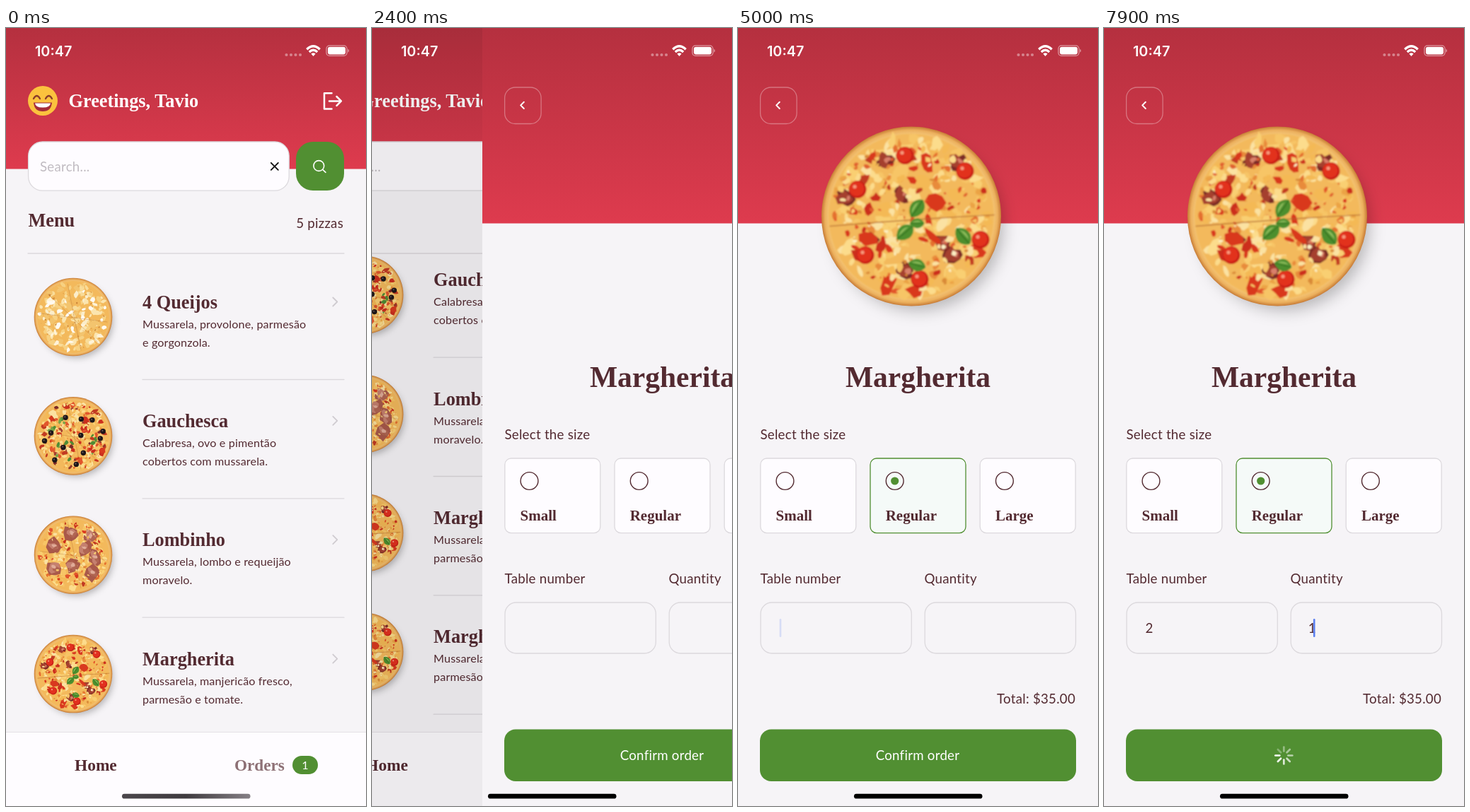
An HTML page that plays this animation: 509x1101 px, repeating every 8 s.

```html
<!DOCTYPE html>
<html lang="en">
<head>
<meta charset="utf-8">
<title>Pizza ordering</title>
<style>
html, body { margin: 0; width: 100%; height: 100%; overflow: hidden; background: #f6f4f7; }
svg { display: block; width: 100vw; height: 100vh; }
text { font: 18.7px Lato, "Open Sans", sans-serif; letter-spacing: .25px; fill: #532a31; white-space: pre; }
.serif { font: bold 26.3px "Liberation Serif", "Noto Serif", serif; letter-spacing: 0; }
.note { font-size: 16.1px; letter-spacing: .15px; }
.clock { font: 600 19.8px Inter, sans-serif; letter-spacing: 0; }
.size { font-size: 21px; }
.white { fill: #fff; }
.line { fill: none; stroke-linecap: round; stroke-linejoin: round; }
</style>
</head>
<body>
<svg id="stage" viewBox="0 0 509 1101" preserveAspectRatio="none" xmlns="http://www.w3.org/2000/svg"></svg>
<script>
const GREEN = '#518f32', MAROON = '#532a31', RULE = '#dcd9dd', PAPER = '#f6f4f7';
const LOOP = 8000, STEP = 100, WIDTH = 509, ROW = 168.35;

// Markup helpers
const text = (x, y, s, cls = '', extra = '') => `<text x="${x}" y="${y}" class="${cls}" ${extra}>${s}</text>`;
const rect = (x, y, w, h, r, fill, extra = '') =>
  `<rect x="${x}" y="${y}" width="${w}" height="${h}" rx="${r}" fill="${fill}" ${extra}/>`;
const circle = (x, y, r, fill, extra = '') => `<circle cx="${x}" cy="${y}" r="${r}" fill="${fill}" ${extra}/>`;
const line = (d, color, width = 1.3) => `<path class="line" d="${d}" stroke="${color}" stroke-width="${width}"/>`;
const outline = (color, width = 1.3) => `stroke="${color}" stroke-width="${width}"`;
const anchor = side => `text-anchor="${side}"`;

// Pizzas: a crust with seeded scatterings of toppings, radius 127
function seeded(seed) {
  return () => (seed = (seed * 16807) % 2147483647) / 2147483647;
}

function blob(random, x, y, size, fill) {
  const turn = random() * 6.283, flat = .4 + random() * .5, points = [];
  for (let k = 0; k < 8; k++) {
    const a = k / 8 * 6.283, r = size * (.6 + random() * .55);
    const px = Math.cos(a) * r, py = Math.sin(a) * r * flat;
    points.push((x + px * Math.cos(turn) - py * Math.sin(turn)).toFixed(1) + ',' +
                (y + px * Math.sin(turn) + py * Math.cos(turn)).toFixed(1));
  }
  return `<polygon points="${points.join(' ')}" fill="${fill}"/>`;
}

function scatter(random, count, colors, min, max, reach = 110) {
  let out = '';
  for (let i = 0; i < count; i++) {
    const angle = random() * 6.283, dist = Math.sqrt(random()) * reach;
    const fill = colors[Math.floor(random() * colors.length)];
    out += blob(random, Math.cos(angle) * dist, Math.sin(angle) * dist, min + random() * (max - min), fill);
  }
  return out;
}

const CHEESE = ['#fcdc8c', '#f9cf72', '#f7c566', '#fbe2a2', '#f4b955'];
const RED = ['#d9391f', '#cc2f1e', '#e2562c', '#c23a22'];
const SAUSAGE = ['#7c2a26', '#93382c', '#a5402f'];
const basil = (x, y, turn, s = 1) =>
  `<g transform="translate(${x} ${y}) rotate(${turn}) scale(${s})">
    <path d="M-15 0Q-7-12 4-10 12-7 15 0 10 10 0 10-10 8-15 0Z" fill="#4d8f2e"/>
    <path d="M-10-2Q0-9 9-3 2-3-10-2Z" fill="#8cbc5c"/>${line('M-13 0Q0 1 13 0', '#2f6d22', 1.2)}</g>`;
const tomato = ([x, y]) => circle(x, y, 12.5, '#c91f16') + circle(x - 1, y - 1, 10.5, '#e2301f') +
  circle(x - 4, y - 4, 2.6, '#f79a7d');
const olive = ([x, y]) => circle(x, y, 8.5, '#1c1518') + circle(x - 2, y - 2, 2.5, '#6b5a5a');
const sausage = r => ([x, y]) => blob(r, x, y, 17, SAUSAGE[0]) + blob(r, x - 2, y - 1, 12, SAUSAGE[2]) +
  blob(r, x + 3, y - 2, 5, '#d9806a');
const ham = r => ([x, y]) => blob(r, x, y, 31, '#a9594a') + blob(r, x - 3, y - 4, 23, '#c5806f') +
  blob(r, x + 5, y + 2, 14, '#b06553') + blob(r, x, y - 5, 9, '#e0ab98');
const sauced = r => scatter(r, 140, CHEESE, 6, 15) + scatter(r, 75, ['#eba345', '#e88b3b', '#e4702f'], 2, 8) +
  scatter(r, 50, RED, 3, 11);

const recipes = {
  cheese: r => scatter(r, 150, ['#f9dc98', '#f7d182', '#fbe5af', '#f3c46e'], 6, 14) +
    scatter(r, 80, ['#dd9c48', '#cb8338', '#e8b159'], 1.5, 4.5) +
    scatter(r, 45, ['#fff3d8', '#fffaf0', '#fbedca'], 6, 13),
  pepper: r => sauced(r) + scatter(r, 22, RED, 9, 16) + scatter(r, 22, SAUSAGE, 4, 9) +
    scatter(r, 95, CHEESE, 3, 10) + scatter(r, 17, ['#4f8d35', '#76a548'], 4, 12, 85) +
    [[-25, -60], [26, -55], [62, -52], [-72, -10], [-93, 16], [25, -2], [88, 8], [-32, 37], [33, 55], [-60, 78], [10, 92], [97, -15]]
      .map(olive).join(''),
  ham: r => sauced(r) + scatter(r, 90, CHEESE, 3, 9) +
    [[-5, -67], [57, -58], [-62, -25], [-62, 44], [70, 12], [36, -18], [0, 38], [62, 60]].map(ham(r)).join('') +
    scatter(r, 40, CHEESE, 2, 6),
  margherita: r => sauced(r) +
    [[-37, -78], [66, -76], [-13, -30], [-92, -24], [45, 38], [-58, 32], [60, 55], [-8, 80]].map(sausage(r)).join('') +
    [[22, -75], [35, -20], [-60, 32], [-34, 96], [5, 105], [92, 48], [30, 28]].map(([x, y]) => blob(r, x, y, 16, RED[0])).join('') +
    scatter(r, 105, CHEESE, 3, 9) + scatter(r, 45, ['#d98a38', '#e0602f', '#fdf0c4'], 1.5, 5) +
    line('M-115 14Q0 4 117-2', 'rgba(176,100,45,.7)', 1.6) +
    [[-9, -86], [76, -64], [-76, -38], [98, 33], [-65, 55], [12, 89]].map(tomato).join('') +
    basil(8, -11, -55) + basil(-9, 23, -40) + basil(73, 28, 50) + basil(8, 69, 15, .85) + basil(8, 10, 0, .7),
};

function pizzaSymbol(name, seed) {
  return `<g id="${name}">
    <g filter="url(#soft)">${circle(10, 13, 120, '#000', 'opacity=".26"')}</g>
    ${circle(0, 0, 127, 'url(#crust)')}
    <g filter="url(#melt)">${circle(0, 0, 117, '#f3b95c')}${recipes[name](seeded(seed))}</g>
    ${name === 'margherita' ? '' : line('M-108-12L110 16M-18-108L25 108M-82-75L78 80', 'rgba(150,80,30,.3)', 2)}
  </g>`;
}
const pizza = (name, x, y, r) => `<use href="#${name}" transform="translate(${x} ${y}) scale(${r / 127})"/>`;

// Home screen
const menu = [
  ['4 Queijos', 'cheese', 'Mussarela, provolone, parmesão', 'e gorgonzola.'],
  ['Gauchesca', 'pepper', 'Calabresa, ovo e pimentão', 'cobertos com mussarela.'],
  ['Lombinho', 'ham', 'Mussarela, lombo e requeijão', 'moravelo.'],
  ['Margherita', 'margherita', 'Mussarela, manjericão fresco,', 'parmesão e tomate.'],
  ['Margherita 2', 'margherita', 'Mussarela, manjericão fresco,', 'parmesão e tomate.'],
];

const menuRow = ([name, kind, first, second], i) => `<g transform="translate(0 ${i * ROW})">
  ${pizza(kind, 95, 409, 55.3)}
  ${text(193, 396.5, name, 'serif')}
  ${text(193, 424.5, first, 'note')}${text(193, 450.5, second, 'note')}
  ${line('M462.3 381.5l6 6-6 6', '#cfcbd0', 1.8)}${line('M193 497.5H478', RULE)}</g>`;

const face = circle(52, 103, 21, '#fbc23e') +
  line('M39 100Q43.5 92 48 100M56 100Q60.5 92 65 100', '#8a3d2a', 2.3) +
  `<path d="M39 105.5H65Q64 118 52 118T39 105.5Z" fill="#a52c3a"/>
   <path d="M41 106.5H63Q62.5 112.5 52 112.5T41 106.5Z" fill="#fff"/>`;

const home = `<g id="home">
  ${rect(0, 0, WIDTH, 1101, 0, PAPER)}
  ${rect(0, 0, WIDTH, 199.5, 0, 'url(#header)')}
  ${face}${text(88.5, 112, 'Greetings, Tavio', 'serif white')}
  ${line('M460.5 92.3H450V114.5H460.5M457 103.4H473.5M467.5 97l6.4 6.4-6.4 6.4', '#fff', 2.5)}
  ${rect(31.6, 161, 368.6, 69.2, 20, '#fefcff', outline(RULE))}
  ${text(48, 202.5, 'Search...', '', 'style="fill:#c1bcc2"')}
  ${line('M374.8 190.8l10 10m0-10l-10 10', '#111', 1.9)}
  ${rect(410, 161, 68, 69, 24, GREEN)}
  ${circle(442.3, 195, 7.4, 'none', outline('#fff', 1.6))}${line('M447.7 200.3l4.3 4', '#fff', 1.6)}
  ${text(31.5, 281, 'Menu', 'serif')}${text(477, 283, '5 pizzas', '', anchor('end'))}
  <g clip-path="url(#list)"><g id="rows">${menu.map(menuRow).join('')}</g></g>
  ${line('M31 319H478', RULE)}
  <g id="bar">${rect(501.3, 0, 4, 439.5, 2, '#939195')}</g>
  ${rect(0, 996, WIDTH, 105, 0, '#fefcff')}${line('M0 996.5H509', '#e4e1e5', 1.2)}
  ${text(97, 1051, 'Home', 'serif', 'style="font-size:23.4px"')}
  ${text(323, 1051, 'Orders', 'serif', 'style="font-size:23.2px;fill:#8d7075"')}
  ${rect(405, 1030, 36, 26, 13, GREEN)}
  ${text(423, 1048.5, '1', 'note white', anchor('middle'))}
  ${rect(0, 0, WIDTH, 1101, 0, '#000', 'id="shade"')}</g>`;

// Order screen
const sizeCard = (label, i) => {
  const x = 31.8 + i * 155.2, radio = circle(x + 34.7, 641, 12.4, 'none', outline(MAROON, 1.4));
  return rect(x, 609, 135, 105.7, 9, '#fefcff', `id="card${i}" ${outline(RULE)}`) + radio +
    text(x + 21.7, 697, label, 'serif size');
};
const field = x => rect(x, 813, 213.3, 72, 16, 'none', outline(RULE));
const spokes = Array.from({ length: 8 }, (_, i) =>
  `<path d="M0-6V-12" stroke="#fff" stroke-width="2.7" stroke-linecap="round" transform="rotate(${i * 45})"/>`).join('');

const order = `<g id="order">
  ${rect(0, 0, WIDTH, 1101, 0, PAPER)}
  ${rect(0, 0, WIDTH, 276.5, 0, 'url(#header)')}
  ${rect(31.6, 84, 51.5, 51.5, 15, 'none', outline('rgba(255,255,255,.32)'))}
  ${line('M58.8 104.8l-4.6 4.6 4.6 4.6', '#fff', 2)}
  <g id="photo">${pizza('margherita', 245, 266.5, 127)}</g>
  ${text(254.5, 508, 'Margherita', 'serif', anchor('middle') + ' style="font-size:41.5px"')}
  ${text(31.5, 582, 'Select the size')}
  ${['Small', 'Regular', 'Large'].map(sizeCard).join('')}
  ${circle(221.7, 641, 5.6, GREEN, 'id="dot"')}
  ${text(31.5, 786, 'Table number')}${text(263.5, 786, 'Quantity')}
  ${field(32)}${field(264.2)}
  ${text(58.5, 855.5, '2', '', 'id="table"')}${text(288.7, 855.5, '1', '', 'id="quantity"')}
  ${rect(-1.3, 836, 2.6, 26, 1.3, '#5a7ff0', 'id="caret"')}
  ${text(477, 956, '', '', 'id="total" ' + anchor('end'))}
  ${rect(31, 992.6, 447, 73.4, 16, GREEN)}
  ${text(254, 1035.5, 'Confirm order', 'white', 'id="confirm" ' + anchor('middle'))}
  <g id="spinner" transform="translate(254.3 1029.5)">${spokes}</g></g>`;

const status = text(41, 39.5, '10:47', 'clock white') +
  [397, 403.5, 410, 416.5].map(x => circle(x - .5, 38, 2.1, 'rgba(255,255,255,.4)')).join('') +
  `<g fill="none" stroke="#fff" stroke-width="3.3">
     <path d="M425.3 30.3Q434.5 21.3 443.7 30.3M428.8 34Q434.5 28.7 440.2 34"/></g>
   <path d="M431.4 36.6Q434.5 34 437.6 36.6L434.5 40Z" fill="#fff"/>` +
  rect(453, 24.8, 29, 14.6, 4.4, 'none', outline('rgba(255,255,255,.5)')) +
  rect(455, 26.8, 25, 10.6, 2.8, '#fff') +
  `<path d="M483.5 29.5q3 2.6 0 5.2Z" fill="rgba(255,255,255,.55)"/>`;

const stage = document.getElementById('stage');
stage.innerHTML = `<defs>
  <linearGradient id="header" x2="0" y2="1"><stop stop-color="#b5303f"/><stop offset="1" stop-color="#de3b4e"/></linearGradient>
  <linearGradient id="grip"><stop stop-color="#4b474b"/><stop offset=".5" stop-color="#3f3b3f"/><stop offset="1" stop-color="#858085"/></linearGradient>
  <radialGradient id="crust"><stop offset=".9" stop-color="#f6cb80"/><stop offset=".96" stop-color="#ecb05d"/><stop offset="1" stop-color="#c67a35"/></radialGradient>
  <filter id="soft" x="-30%" y="-30%" width="160%" height="160%"><feGaussianBlur stdDeviation="11"/></filter>
  <filter id="melt"><feGaussianBlur stdDeviation=".9"/></filter>
  <clipPath id="list"><rect x="0" y="319" width="509" height="677"/></clipPath>
  ${Object.keys(recipes).map((name, i) => pizzaSymbol(name, 911 + i * 7717)).join('')}
  </defs>${home}${order}${status}${rect(164, 1083.8, 181.5, 6.8, 3.4, '#000', 'id="homebar"')}`;

// Timeline
const el = id => document.getElementById(id);
const show = (id, on) => el(id).setAttribute('opacity', +on);
const move = (id, x, y) => el(id).setAttribute('transform', `translate(${x} ${y})`);
const steps = (t, start, values) => t < start ? 0 : values[Math.min(values.length - 1, Math.floor((t - start) / STEP))];

function caretOpacity(t) {
  if (t < 4300) return 0;
  if (t < 5600) return 1 - steps(t, 4900, [.4, .8, 1]);
  if (t < 7100) return 1 - steps(t, 6500, [.5, 1]);
  if (t < 7800) return 1 - steps(t, 7400, [.4, .8, 1]);
  return 1;
}

function draw(time) {
  const t = Math.floor(time % LOOP / STEP) * STEP;
  const scroll = steps(t, 700, [14, 66, 122, 165, 189, 199.7]);
  const push = steps(t, 2200, [.05, .38, .6935, .87, .95, .985, .997, 1]);
  const chosen = t >= 3600, typedTable = t >= 5600, typedQuantity = t >= 7100, sending = t >= 7900;

  move('rows', 0, -scroll);
  move('bar', 0, 323.8 + scroll * .649);
  show('bar', t >= 700);
  move('home', -.3 * WIDTH * push, 0);
  show('shade', .1 * push);
  move('order', WIDTH * (1 - push), 0);
  el('homebar').setAttribute('fill', push > .1 ? '#000' : 'url(#grip)');

  show('photo', t >= 2600);
  show('dot', chosen);
  el('card1').setAttribute('fill', chosen ? '#f5faf8' : '#fefcff');
  el('card1').setAttribute('stroke', chosen ? GREEN : RULE);
  el('total').textContent = chosen ? 'Total: $35.00' : 'Total: $0.00';

  show('table', typedTable);
  show('quantity', typedQuantity);
  move('caret', t < 6200 ? (typedTable ? 70.5 : 60) : (typedQuantity ? 297.2 : 292.3), 0);
  show('caret', caretOpacity(t));

  show('confirm', !sending);
  show('spinner', sending);
  const head = 6 + Math.floor((t - 7900) / STEP);
  [...el('spinner').children].forEach((spoke, i) =>
    spoke.setAttribute('opacity', 1 - ((head - i + 16) % 8) * .1));
}

const began = performance.now();
function tick() {
  draw(performance.now() - began);
  requestAnimationFrame(tick);
}
tick();
</script>
</body>
</html>
```
